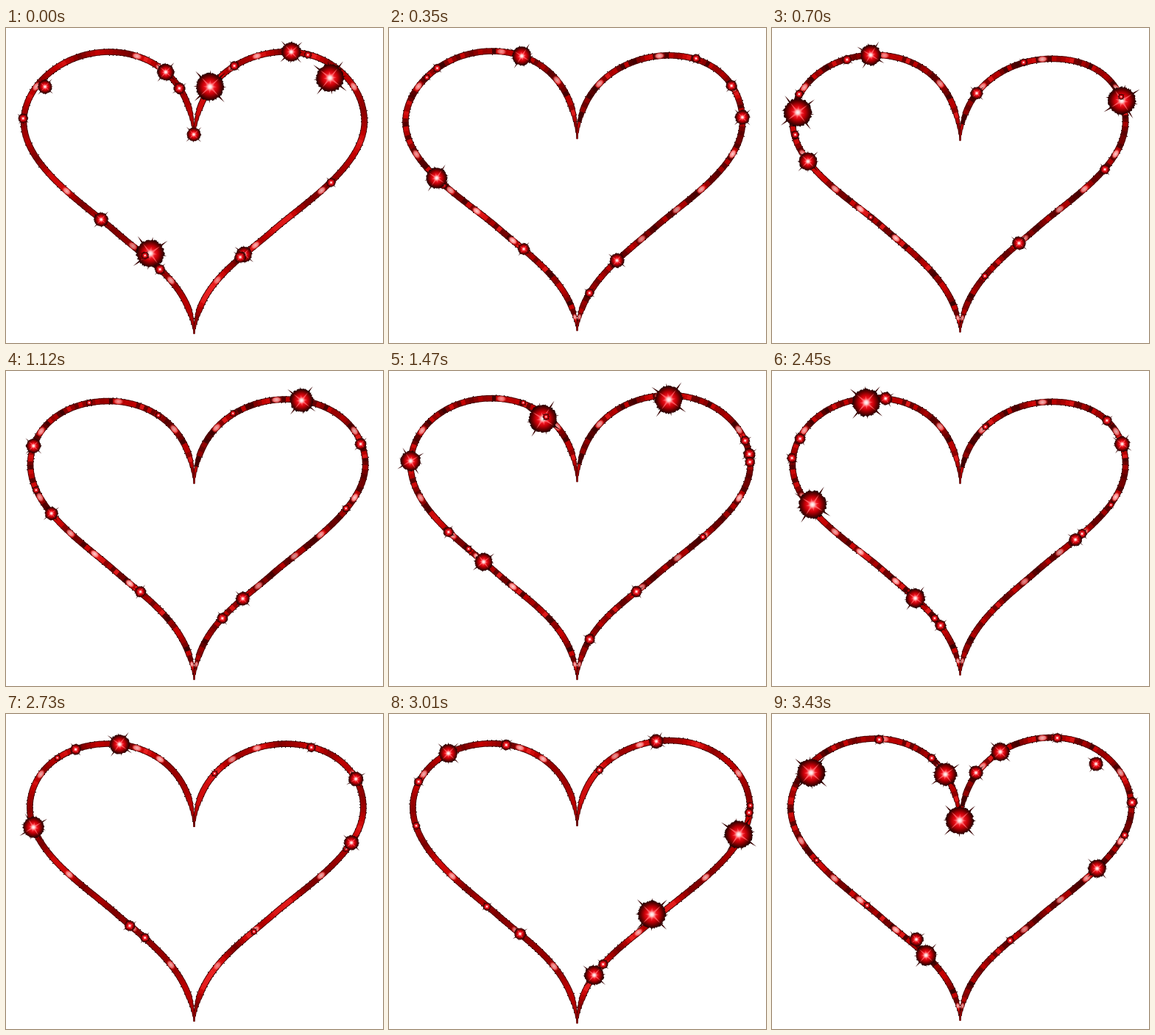
Recreate the animation shown at these times as an HTML page with a canvas. Size 512 by 429 pixels, loop 3.5 s.

```html
<!DOCTYPE html>
<html lang="en">
<head>
<meta charset="utf-8">
<title>Sparkling heart</title>
<style>
  html, body { margin: 0; width: 100%; height: 100%; overflow: hidden; background: #fff; }
  canvas { display: block; }
</style>
</head>
<body>
<canvas id="stage" width="512" height="429"></canvas>
<script>
const ctx = document.getElementById('stage').getContext('2d');
const STEP = 70, COUNT = 50, SWAY = 25, PIECES = 120, TAU = Math.PI * 2;

// Repeatable noise in 0..1
function noise(a, b = 0) {
  const v = Math.sin(a * 127.1 + b * 311.7 + 7.3) * 43758.5453;
  return v - Math.floor(v);
}

// The outline sways twice per loop; each part peaks at its own step
const wave = (frame, mean, size, peak) => mean + size * Math.cos((frame - peak) / SWAY * TAU);

// One half from cleft to tip, as four joined curves; the right half is mirrored
function halfCurve(frame, side) {
  const x = 23 + (side ? wave(frame, 3, 6, 7.5) : wave(frame, 4.5, 5.5, 16));
  const y = 34 + (side ? wave(frame, 3, 5, 11) : wave(frame, 2, 5, 15.7));
  const sag = side ? wave(frame, 1, 4.5, 20.5) : wave(frame, 0.5, 4, 23);
  const peak = side ? 131 : 140;
  const cleft = wave(frame, 152, 2, 13), tip = wave(frame, 415.5, 4.5, 18.5);
  return [[255.5, cleft], [252, y + 32], [peak + 52, y], [peak, y],
    [peak - 65, y], [x, 80], [x, 128],
    [x + 1, 190], [110, 238 + sag], [152, 276 + sag],
    [196, 314 + sag], [250, 350], [255.5, tip]];
}

function pointOn(curve, u, side) {
  const s = Math.min(3, Math.floor(u)), t = u - s, q = 1 - t;
  const [a, b, c, d] = curve.slice(s * 3, s * 3 + 4);
  const mix = i => q * q * q * a[i] + 3 * q * q * t * b[i] + 3 * q * t * t * c[i] + t * t * t * d[i];
  return [side ? 511 - mix(0) : mix(0), mix(1)];
}

const widthAt = u => Math.min(8.6, 1.5 + u * 38, 1.5 + (4 - u) * 38);

function bandColour(i, side, rough) {
  const tag = side * 5 + (rough ? 2 : 1);
  let v = 60 + 165 * noise(i, tag);
  if (!rough) {
    const j = Math.floor(i / 4), k = i / 4 - j;
    v = 115 + 120 * (noise(j, tag) * (1 - k) + noise(j + 1, tag) * k);
  }
  const g = Math.max(0, v - 195) * 0.9;
  return `rgb(${v | 0},${g | 0},${g | 0})`;
}

function radial(r, ...stops) {
  const g = ctx.createRadialGradient(0, 0, 0, 0, 0, r);
  stops.forEach(([at, colour]) => g.addColorStop(at, colour));
  return g;
}

function disc(r, fill) {
  ctx.fillStyle = fill;
  ctx.beginPath();
  ctx.arc(0, 0, r, 0, TAU);
  ctx.fill();
}

function glint(x, y, angle, w, strength) {
  ctx.save();
  ctx.translate(x, y);
  ctx.rotate(angle);
  ctx.scale(1.5, 0.95);
  disc(w * 0.58, radial(w * 0.58,
    [0, `rgba(255,215,215,${strength})`],
    [0.6, `rgba(255,130,130,${strength})`],
    [1, 'rgba(240,20,20,0)']));
  ctx.restore();
}

const ROUGH_GLINTS = [0.4, 0.92, 1.65, 2.25, 2.57, 2.78, 3.12, 3.9];
const SMOOTH_GLINTS = [0.55, 0.76, 1.65, 2.56, 3.15, 3.55];

function drawHalf(curve, side, rough) {
  const pts = Array.from({ length: PIECES + 1 }, (_, i) => pointOn(curve, i / PIECES * 4, side));
  const strokePieces = (trim, colour) => {
    for (let i = 0; i < PIECES; i++) {
      const [x0, y0] = pts[i], [x1, y1] = pts[i + 1];
      ctx.strokeStyle = colour(i);
      ctx.lineWidth = Math.max(0.7, widthAt((i + 0.5) / PIECES * 4) - trim);
      ctx.beginPath();
      ctx.moveTo(x0, y0);
      ctx.lineTo(x1 + (x1 - x0) * 0.2, y1 + (y1 - y0) * 0.2);
      ctx.stroke();
    }
  };
  strokePieces(0, () => '#4a0000');
  strokePieces(2, i => bandColour(i, side, rough));

  // Ragged dark specks on both edges
  ctx.fillStyle = '#180000';
  for (let i = 1; i < PIECES; i++) {
    const [x0, y0] = pts[i - 1], [x1, y1] = pts[i + 1];
    const len = Math.hypot(x1 - x0, y1 - y0);
    for (const edge of [-1, 1]) {
      if (noise(i, edge * 9 + side + (rough ? 3 : 0)) > 0.55) continue;
      const d = edge * (widthAt(i / PIECES * 4) / 2 + 0.2) / len;
      ctx.fillRect(Math.round(pts[i][0] - (y1 - y0) * d - 0.5), Math.round(pts[i][1] + (x1 - x0) * d - 0.5), 1, 1);
    }
  }

  for (const u of rough ? ROUGH_GLINTS : SMOOTH_GLINTS) {
    const [x, y] = pointOn(curve, u, side), [x2, y2] = pointOn(curve, u + 0.01, side);
    glint(x, y, Math.atan2(y2 - y, x2 - x), widthAt(u), 0.65 + 0.35 * noise(u, side));
  }
}

function ray(angle, from, to, width) {
  const c = Math.cos(angle), s = Math.sin(angle);
  ctx.beginPath();
  ctx.moveTo(c * from - s * width, s * from + c * width);
  ctx.lineTo(c * to, s * to);
  ctx.lineTo(c * from + s * width, s * from - c * width);
  ctx.fill();
}

function drawStar({ x, y, r, seed }, scale) {
  r *= scale;
  const tilt = (noise(seed, 1) - 0.5) * 0.5 + Math.PI / 4;
  const rays = (from, long, short, width) => {
    for (let i = 0; i < 8; i++) ray(tilt + i * TAU / 8, from, i % 2 ? short : long, width);
  };
  ctx.save();
  ctx.translate(x, y);

  ctx.fillStyle = '#380000';
  rays(r * 0.6, r * 1.45, r * 1.12, Math.max(0.8, r * 0.09));

  ctx.fillStyle = radial(r,
    [0, '#ff5058'], [0.25, '#f81c28'], [0.5, '#c80008'], [0.75, '#640000'], [1, '#100000']);
  ctx.beginPath();
  const teeth = Math.max(20, Math.round(r * 4.5));
  for (let i = 0; i < teeth; i++) {
    const a = i / teeth * TAU, d = r * (0.88 + 0.12 * noise(i, seed));
    ctx.lineTo(Math.cos(a) * d, Math.sin(a) * d);
  }
  ctx.fill();

  ctx.fillStyle = 'rgba(255,100,108,0.85)';
  rays(0, r * 0.82, r * 0.45, r * 0.09);
  disc(r * 0.34, radial(r * 0.34,
    [0, '#fff'], [0.4, 'rgba(255,210,210,0.9)'], [1, 'rgba(255,80,80,0)']));
  ctx.restore();
}

// The largest stars: step, x, y
const LEADS = [
  [0, 277, 80], [0, 440, 68], [0, 196, 307],
  [10, 35, 115], [10, 475, 99],
  [21, 209, 65], [21, 380, 39],
  [28, 175, 48], [28, 35, 160],
  [35, 128, 43], [35, 55, 182],
  [43, 475, 164], [43, 357, 273],
  [49, 53, 80], [49, 255, 145]
];
const stars = LEADS.map(([at, x, y]) => ({ at, x, y, r: 20, seed: x + at }));

// Smaller stars open and close at seeded places along the outline
for (let at = 0; at < COUNT; at++) {
  for (let i = 0; i < 4; i++) {
    const seed = at * 4 + i, side = i % 2;
    const u = 0.3 + 1.7 * ((i >> 1) + noise(seed, 2));
    const [x, y] = pointOn(halfCurve(at, side), u, side);
    stars.push({
      at, x, y, seed,
      r: 8 + 9 * noise(seed, 5)
    });
  }
}

function draw(time) {
  const frame = Math.floor(time / STEP) % COUNT;
  const rough = (frame * 6 + 3) % 13 > 4;
  ctx.fillStyle = '#fff';
  ctx.fillRect(0, 0, 512, 429);
  for (const side of [0, 1]) drawHalf(halfCurve(frame, side), side, rough);
  for (const star of stars) {
    const gap = Math.abs(star.at - frame), away = Math.min(gap, COUNT - gap);
    if (away < 2) drawStar(star, away ? 0.5 : 1);
  }
}

const start = performance.now();
function tick() {
  draw(performance.now() - start);
  requestAnimationFrame(tick);
}
tick();
</script>
</body>
</html>
```
